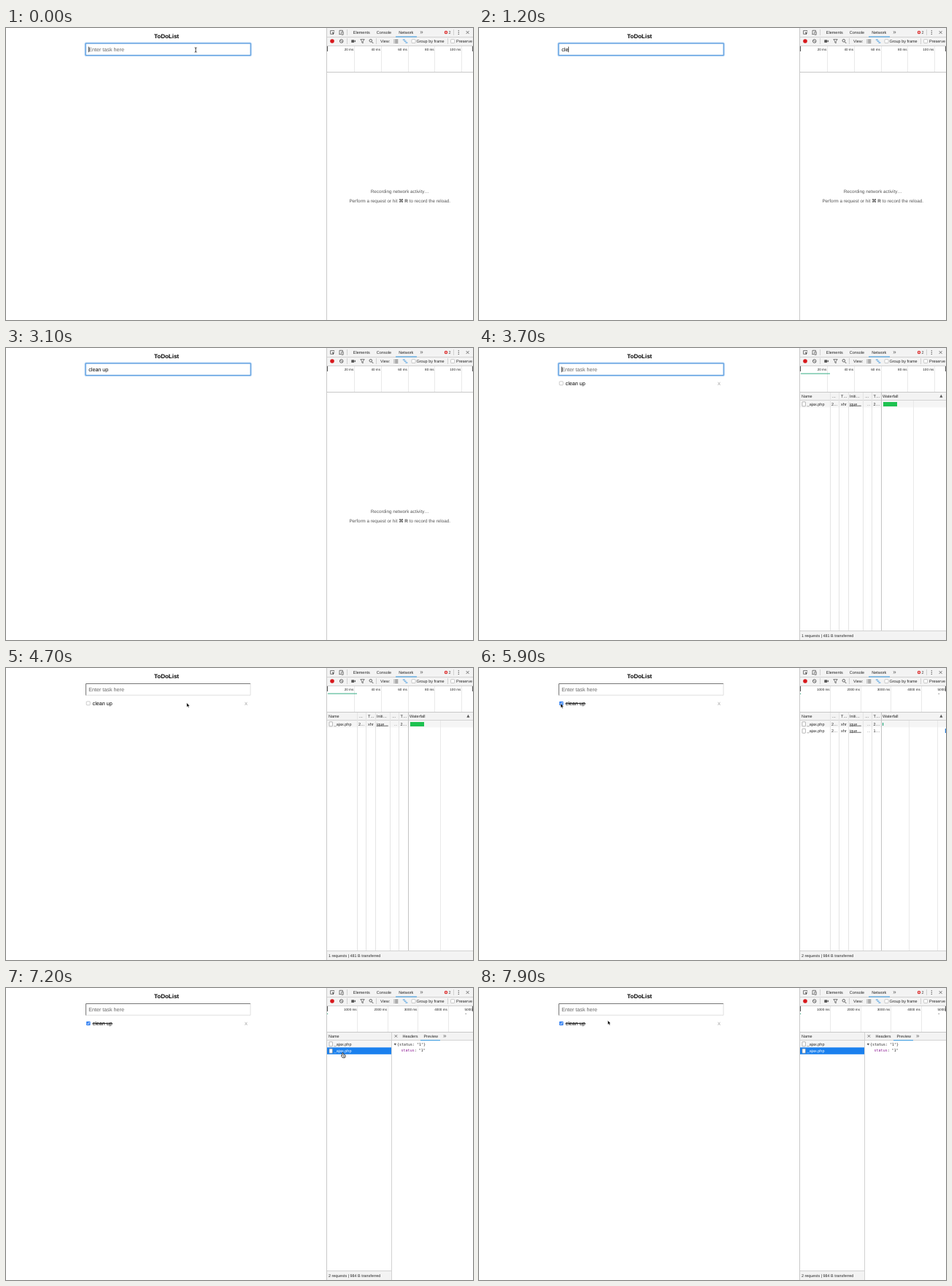
Recreate the animation shown at these times as an HTML page. Size 640 by 400 pixels, loop 8000 ms.

```html
<!DOCTYPE html>
<html lang="en">
<head>
<meta charset="utf-8">
<title>To-do list with network panel</title>
<style>
html, body { margin: 0; width: 100%; height: 100%; overflow: hidden; background: #fff; }
svg { display: block; width: 640px; height: 400px; font-family: "Liberation Sans", Arial, sans-serif; }
text { white-space: pre; text-rendering: geometricPrecision; }
.mono { font-family: "DejaVu Sans Mono", monospace; }
</style>
</head>
<body>
<svg id="stage" viewBox="0 0 640 400"></svg>
<script>
const LOOP = 8000;
const KEYS = [700, 900, 1200, 1300, 1500, 1800, 2100, 2400];
const TASK = 'clean up';
const SENT = 3400, LISTED = 3500, BLUR = 4300, CHECKED = 5800, OPENED = 7200;
const BAR = '#f3f3f3', LINE = '#d2d2d2', INK = '#262626';

// Pointer stops: time, x, y
const STOPS = [
  [0, 260, 30], [4000, 260, 30], [4400, 247.7, 47.8], [4900, 247.7, 47.8],
  [5500, 112, 48.8], [6000, 112, 48.8], [6500, 461.5, 88.3],
  [7400, 461.5, 88.3], [7900, 176.5, 44.5], [8000, 176.5, 44.5]
];

const rect = (x, y, w, h, fill, more = '') =>
  `<rect x="${x}" y="${y}" width="${w}" height="${h}" fill="${fill}" ${more}/>`;
const vline = (x, y, h, color = LINE) => rect(x, y, 1, h, color);
const hline = (x, y, w, color = LINE) => rect(x, y, w, 1, color);
const text = (x, y, s, size = 5.5, fill = INK, more = '') =>
  `<text x="${x}" y="${y}" font-size="${size}" fill="${fill}" ${more}>${s}</text>`;
const path = (d, stroke = '#5a5a5a', fill = 'none', width = .8) =>
  `<path d="${d}" stroke="${stroke}" fill="${fill}" stroke-width="${width}"/>`;
const circle = (x, y, r, fill, stroke = 'none') =>
  `<circle cx="${x}" cy="${y}" r="${r}" fill="${fill}" stroke="${stroke}" stroke-width=".9"/>`;
const box = (x, y, size = 5) =>
  rect(x, y, size, size, '#fff', 'rx=".8" stroke="#aaa" stroke-width=".6"');
const at = (x, y, s) => `<g transform="translate(${x.toFixed(2)} ${y.toFixed(2)})">${s}</g>`;
const MID = 'text-anchor="middle"', END = 'text-anchor="end"', BOLD = 'font-weight="bold"';

function toolbar() {
  return rect(439, 0, 201, 24, BAR) + hline(440, 12, 200) + hline(440, 24, 200) +
    path('M449 8.3H444.6V3.6H449.6V5') + path('M447 5.4l3.6 1.4-1.6.7-.6 1.7z', 'none', '#444') +
    path('M457 8.6V3.3H461.5V4.6M456.4 8.6H459') + path('M459.9 5.2h2.3v4h-2.3z') +
    vline(467, 2, 8) +
    text(475.8, 8, 'Elements') + text(507.8, 8, 'Console') + text(538.2, 8, 'Network', 5.5, '#222') +
    rect(534, 11.4, 29, 1.2, '#4ba3e2') + text(567.2, 8, '»', 8, '#555') +
    circle(603, 6, 2.3, '#dc3b3b') + path('M602.1 5.1l1.8 1.8m0-1.8l-1.8 1.8', '#fff', 'none', .6) +
    text(606.4, 8, '2', 5.5, '#444') + vline(613, 2, 8) +
    [3.6, 6, 8.4].map(y => circle(620.3, y, .7, '#555')).join('') +
    path('M630.6 4l4 4m0-4l-4 4') +
    circle(447, 18, 2.8, '#d8181c') + circle(459.7, 18, 2.3, 'none', '#555') + path('M458.1 16.4l3.2 3.2') +
    vline(467, 14, 8) +
    rect(473.3, 16.2, 3.8, 3.7, '#555', 'rx=".5"') + path('M477 18l2-1.6v3.2z', 'none', '#555') +
    path('M485.8 15.6H491.2L489.2 18.2V20.8L487.8 20V18.2z') +
    circle(499.8, 17.3, 1.8, 'none', '#555') + path('M501.2 18.8l2.1 2.2', '#555', 'none', 1) +
    vline(507, 14, 8) + text(513, 20, 'View:') +
    [15.8, 17.8, 19.8].map(y => rect(531.4, y, 1, .9, '#555') + rect(533.1, y, 4.2, .9, '#555')).join('') +
    rect(543.8, 15.6, 3, 1, '#3b95dc') + rect(545.5, 17.6, 3, 1, '#3b95dc') +
    rect(547.4, 19.6, 3, 1, '#3b95dc') +
    box(556, 15.6) + text(562.4, 20, 'Group by frame') + vline(605, 14, 8) +
    box(609.6, 15.6) + text(617, 20, 'Preserve');
}

function overview(first, step, unit) {
  let s = '';
  for (let i = 0; i < 5; i++) {
    const x = first + step * i;
    s += vline(Math.round(x + .8), 25, 35, '#e9e9e9') + text(x, 30.9, `${unit * (i + 1)} ms`, 4.6, '#222', END);
  }
  return s + rect(440, 25, 1, 7, '#555') + rect(639, 25, 1, 7, '#555') + hline(440, 60, 200, '#c8c8c8');
}

function idlePanel() {
  return text(539.7, 226.3, 'Recording network activity…', 6.3, '#555', MID) +
    text(539.7, 238.9, `Perform a request or hit <tspan ${BOLD}>⌘ R</tspan> to record the reload.`, 6.3, '#555', MID);
}

const fileCell = (y, color = INK) =>
  rect(443, y + 1.8, 4.4, 6, '#fff', 'rx=".5" stroke="#888" stroke-width=".6"') +
  text(449.6, y + 6.6, '_ajax.php', 5.5, color);

function row(y, size, fill) {
  return rect(440, y, 200, 9.4, fill) + fileCell(y) +
    text(483, y + 6.6, '2…') + text(496, y + 6.6, 'xhr') +
    text(508, y + 6.6, 'jque…') + rect(508, y + 7.1, 15.8, .5, INK) +
    text(531.2, y + 6.6, '…', 5.5, '#777') + text(540.6, y + 6.6, size);
}

function table(t) {
  const both = t >= CHECKED, hover = t >= 6450 && t < OPENED;
  let s = rect(440, 61, 200, 11, BAR) + hline(440, 71, 200) + row(72, '2…', '#f5f5f5');
  if (both) s += row(81.4, '1…', hover ? '#edf4fd' : '#fff');
  for (const x of [481, 493, 506, 526, 538]) s += vline(x, 61, 327, '#e4e4e4');
  for (const x of both ? [589, 628] : [595]) s += vline(x, 72, 316, '#e9e9e9');
  s += vline(551, 61, 327, '#c4c4c4');
  for (const [x, name] of [[442, 'Name'], [483.4, '…'], [496, 'T…'], [508, 'Initi…'],
    [529, '…'], [540.6, 'T…'], [553, 'Waterfall']]) s += text(x, 68, name);
  s += path('M631.4 67.8h4l-2-4z', 'none', '#555');
  return s + (both
    ? rect(553, 75, 1.2, 4, '#2aa87c') + rect(638.8, 83, 1.2, 6, '#2d7fd6')
    : rect(554, 74, 19, 6, '#1ec250'));
}

function preview() {
  return rect(440, 61, 200, 11, BAR) + hline(440, 71, 200) + text(442, 68, 'Name') +
    rect(440, 72, 88, 9.4, '#f5f5f5') + fileCell(72) +
    rect(440, 81.4, 88, 9.4, '#1a80ee') + fileCell(81.4, '#fff') +
    vline(528, 61, 339) +
    path('M532.7 64.2l3.4 3.4m0-3.4l-3.4 3.4') + text(543.6, 68, 'Headers') + text(572.4, 68, 'Preview') +
    rect(568, 71, 27, 1.2, '#4ba3e2') + text(599, 68.3, '»', 8, '#555') +
    path('M531.6 76h3.4l-1.7 2.8z', 'none', '#555') +
    text(536, 79.2, '{status: "1"}', 5, '#222', 'class="mono"') +
    text(541.6, 87, '<tspan fill="#881391">status</tspan>: "1"', 5, '#222', 'class="mono"');
}

function network(t) {
  const both = t >= CHECKED, open = t >= OPENED;
  let s = rect(439, 0, 201, 400, '#fff') + toolbar() +
    (both ? overview(480.6, 41.4, 1000) : overview(476.2, 36.8, 20));
  if (t < LISTED) s += idlePanel();
  else {
    s += both
      ? rect(440, 34.8, 1.2, 1, '#2aa87c') + rect(629.6, 34.8, 1.2, 1, '#666')
      : rect(441, 34.6, 40, 1, '#35ad85');
    s += open ? preview() : table(t);
    s += rect(440, 388, open ? 88 : 200, 12, BAR) + hline(440, 387, open ? 88 : 200) +
      text(442, 395.8, both ? '2 requests | 984 B transferred' : '1 requests | 481 B transferred', 5.4);
  }
  return s + vline(439, 0, 400, '#c8c8c8');
}

function caretOn(t) {
  if (t < KEYS[0]) return t < 100 || t >= 600;
  const last = Math.max(...[...KEYS, SENT].filter(k => k <= t));
  return (t - last) % 1000 < 500;
}

function page(t) {
  const typed = t < SENT ? TASK.slice(0, KEYS.filter(k => k <= t).length) : '';
  let s = text(220, 14.1, 'ToDoList', 8, '#000', `${BOLD} ${MID}`);
  if (t < BLUR) {
    s += rect(109, 21, 226.3, 16.5, '#fff', 'rx="1" stroke="#b9d7f5" stroke-width="3"') +
      rect(109.2, 21.2, 226, 16.2, '#fff', 'rx=".5" stroke="#5f9fe0" stroke-width="1.3"');
  } else {
    s += path('M109.5 37.5V21.5H335', '#777', 'none', 1) + path('M109.5 37.2H335V21.5', '#d8d8d8', 'none', .8);
  }
  s += text(113.2, 31.9, typed || 'Enter task here', 7.2, typed ? '#000' : '#666');
  if (t < BLUR && caretOn(t)) s += rect(113.2 + textWidth(typed), 25.6, .7, 7.6, '#000');
  if (t >= LISTED) {
    const done = t >= CHECKED;
    s += done
      ? rect(110, 45.7, 5.6, 5.6, '#3c86f2', 'rx="1"') + path('M111.2 48.6l1.2 1.3 2-3', '#fff')
      : box(110.2, 45.8, 5);
    s += text(118.6, 50.7, TASK, 7.2, '#000') + text(329, 50.6, 'x', 8, '#aaa', MID);
    if (done) s += rect(118.6, 48, 27.2, .8, '#000');
  }
  return s;
}

const pen = document.createElement('canvas').getContext('2d');
pen.font = '72px "Liberation Sans", Arial, sans-serif';
const textWidth = s => pen.measureText(s).width / 10;

function tooltip(t) {
  if (t < 6900 || t >= OPENED) return '';
  const alpha = Math.min(1, (t - 6850) / 300).toFixed(2);
  return `<g opacity="${alpha}">` +
    rect(466.5, 95.8, 133.5, 10, '#fafafa', 'rx="1" stroke="#bbb" stroke-width=".7"') +
    text(470, 102.4, 'http://localhost:8888/git_up/php_TodoApp/_ajax.php', 5.45, '#444') + '</g>';
}

function pointer(t) {
  if (t >= KEYS[0] && t < 4000) return '';
  const i = STOPS.findIndex(p => p[0] > t);
  const [t0, x0, y0] = STOPS[i - 1], [t1, x1, y1] = STOPS[i];
  const u = (t - t0) / (t1 - t0), k = u * u * (3 - 2 * u);
  const x = x0 + (x1 - x0) * k, y = y0 + (y1 - y0) * k;
  if (x > 109 && x < 335 && y < 38)
    return at(x, y, path('M-1.4-3.2Q0-3.2 0-2.2Q0-3.2 1.4-3.2M0-2.4V2.4M-1.4 3.2Q0 3.2 0 2.2Q0 3.2 1.4 3.2', '#111', 'none', .8));
  if (x > 440 && y > 81 && t < OPENED + 200)
    return at(x, y, path('M-.8.6Q0-.4.6.6V2.6L3 3.1Q4 3.4 3.8 4.8L3 7.2H-.3L-2.2 4.4Q-1.9 3.3-.8 4.2zM.9 4.2V5.8M2.2 4.4V5.8', '#222', '#fff', .8));
  return at(x, y, path('M0 0V5.6L1.3 4.4 2.2 6.5 3.2 6.1 2.3 4.1H4z', '#fff', '#000', .4));
}

const stage = document.getElementById('stage');
let shown = '';
function draw(now) {
  const t = now % LOOP;
  const s = page(t) + network(t) + tooltip(t) + pointer(t);
  if (s !== shown) stage.innerHTML = shown = s;
  requestAnimationFrame(() => draw(performance.now() - start));
}
const start = performance.now();
draw(0);
</script>
</body>
</html>
```
